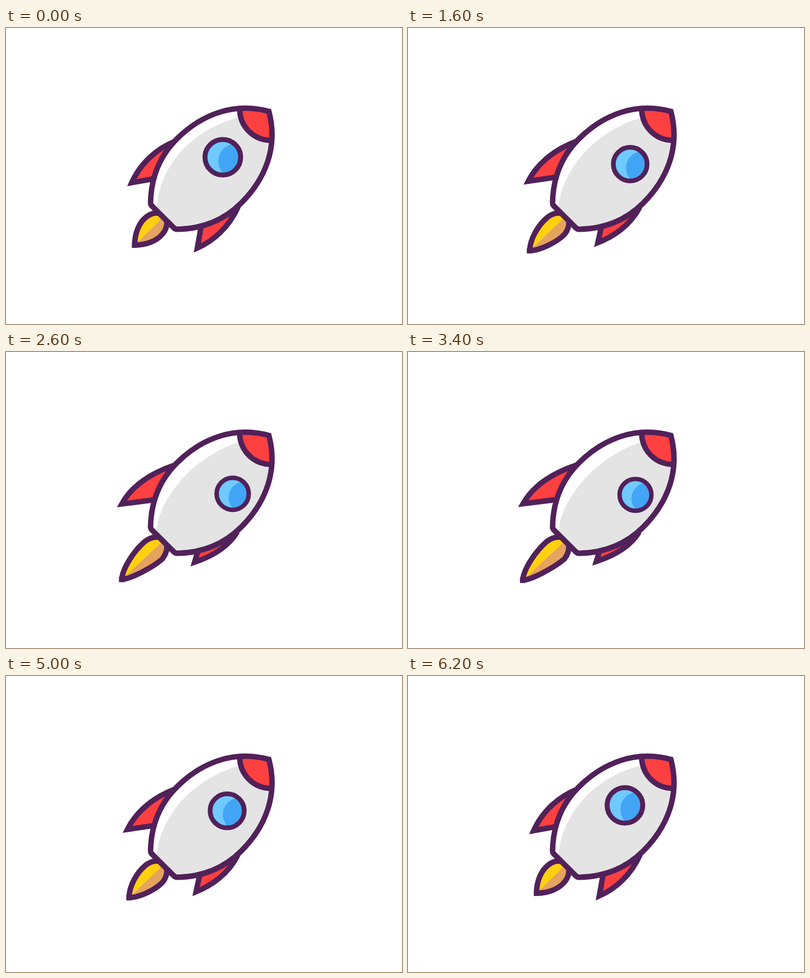
Recreate the animation shown at these times as an HTML page. Size 800 by 600 pixels, loop 6.4 s.

```html
<!DOCTYPE html>
<html lang="en">
<head>
<meta charset="utf-8">
<title>Rocket</title>
<style>
  html, body { margin: 0; width: 100%; height: 100%; overflow: hidden; background: #fff; }
  svg { display: block; width: 800px; height: 600px; }
  .line { stroke: #51215a; stroke-width: 11; }
  .red { fill: #ff4040; }
  .flame { stroke-linecap: square; }
</style>
</head>
<body>
<svg viewBox="0 0 800 600" fill="none">
  <defs>
    <path id="hull" d="M531 169C460 150 395 175 345 225C310 260 293 305 292 354Q292 358 295 361L339 405Q342 408 346 408C395 407 440 390 475 355C525 305 550 240 531 169Z"/>
    <clipPath id="inHull"><use href="#hull"/></clipPath>
    <clipPath id="inPane"><circle r="34"/></clipPath>
  </defs>

  <path id="flame1" class="line flame" fill="#ffd00d"/>
  <path id="flame2" class="line flame" fill="#e5a35d"/>
  <path id="fin1" class="line red"/>
  <path id="fin2" class="line red"/>

  <use href="#hull" fill="#fff"/>
  <g clip-path="url(#inHull)">
    <path id="shade" fill="#e4e4e4"/>
    <path class="line red" d="M472 155V163C472 200 500 228 537 228H560V155Z"/>
  </g>
  <use href="#hull" class="line"/>

  <g id="pane">
    <circle r="34" fill="#6fcaff"/>
    <circle cx="26" cy="8" r="35.2" fill="#42a5f5" clip-path="url(#inPane)"/>
    <circle r="36" class="line" style="stroke-width: 10"/>
  </g>
</svg>
<script>
const LOOP = 6400, STEP = 200;
const $ = id => document.getElementById(id);
const shape = (id, d) => $(id).setAttribute('d', d);

// Reflection in the rocket's axis, the line x + y = 700.
for (const id of ['flame2', 'fin2'])
  $(id).setAttribute('transform', 'matrix(0 -1 -1 0 700 700)');

// p is the roll of the rocket: a fin swings out on one side, in on the other.
const fin = p => `M305 ${304.5 - 6 * p}L${254 - 21.8 * p} ${313.5 - 6 * p}` +
  `C${268 - 17.5 * p} ${282 - 7.6 * p} ${295 - 8 * p} ${250 - 3 * p} ${338 + 3 * p} ${231 - 2 * p}`;

// Half a flame, stretched by p and bent sideways by k.
const flame = (p, k) => `M319 381L314 376L304 375` +
  `C296.5 375.3 ${289.5 - p} 378 ${283.5 - 3 * p} ${383 + p}` +
  `C${269 - 10 * p - 2 * k} ${394 + 11 * p + k} ${260 - 24.5 * p - k} ${415.5 + 31 * p - k} ` +
  `${260 - 25.6 * p - k} ${440 + 25.6 * p - k}`;

// Grey side of the hull; its edge slides inward by s.
const shade = s => `M478 180C${425 + s} ${189 + s} ${380 + s} ${218 + s} ${350 + s} ${252 + s}` +
  `C${322 + s} ${285 + s} 307 325 304 364L340 420H560V180Z`;

function draw(now) {
  const t = Math.floor(now % LOOP / STEP) * STEP;
  const p = (1 - Math.cos(2 * Math.PI * t / LOOP)) / 2;

  shape('fin1', fin(p));
  shape('fin2', fin(-p));
  shape('flame1', flame(p, 2.8 * p));
  shape('flame2', flame(p, -2.8 * p));
  shape('shade', shade(1 + 5 * p));
  $('pane').setAttribute('transform',
    `translate(${438 + 21.8 * p} ${262 + 27.8 * p}) scale(${1 - 0.107 * p})`);
}

function tick() {
  draw(performance.now());
  requestAnimationFrame(tick);
}
tick();
</script>
</body>
</html>
```
